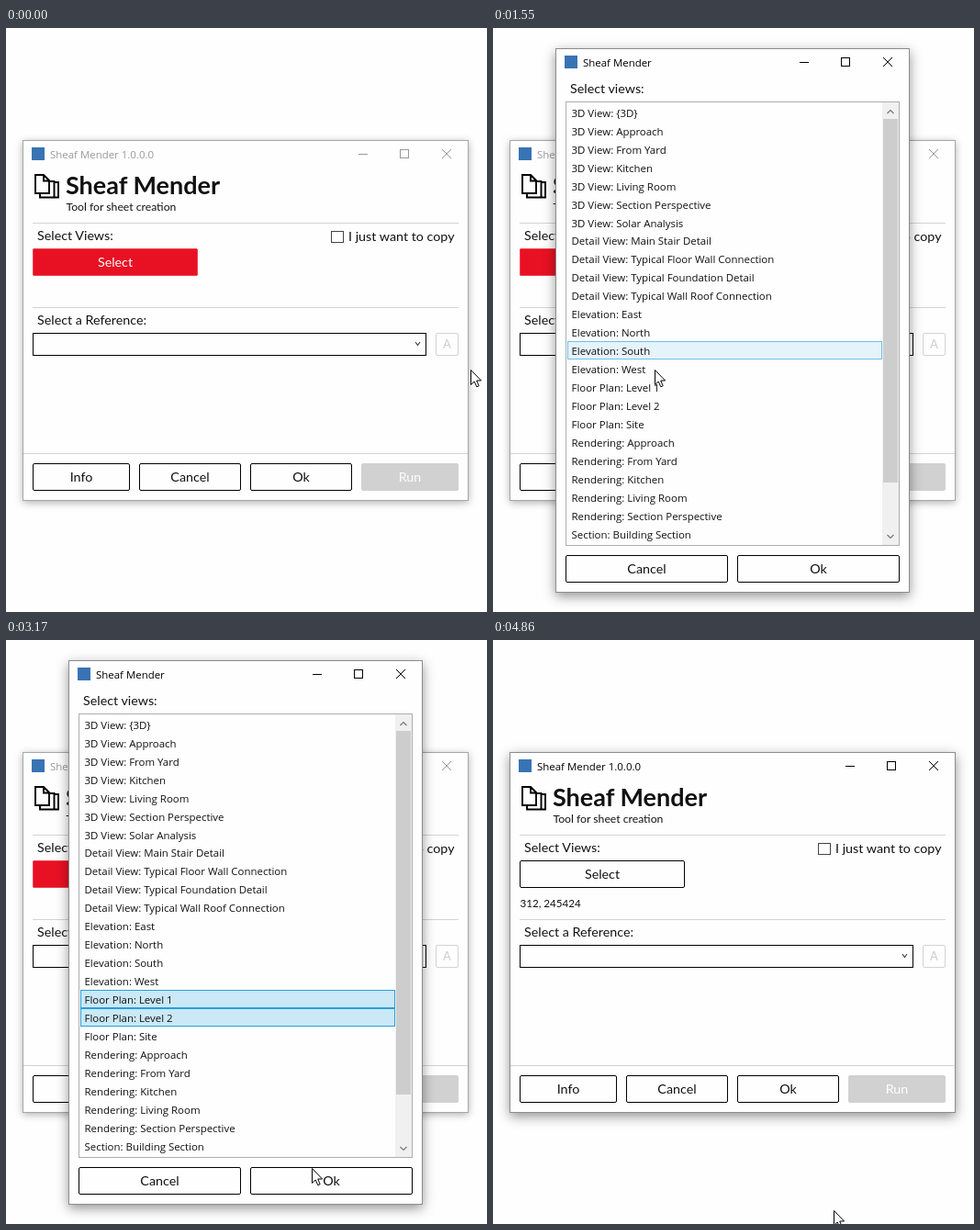
Recreate the animation shown at these times as an HTML page. Size 524 px wide and 636 px high, loop 4890 ms.

```html
<!DOCTYPE html>
<html lang="en">
<head>
<meta charset="utf-8">
<title>Sheaf Mender</title>
<style>
html, body { margin: 0; width: 100%; height: 100%; overflow: hidden; background: #fefefe; }
.layer, .layer svg, #cursor { position: absolute; left: 0; top: 0; }
.layer { width: 524px; height: 636px; }
.frame { position: absolute; box-sizing: border-box; background: #fefefe; border: 1px solid #a6a6a6; box-shadow: 0 2px 8px rgba(0,0,0,.3); }
.active .frame { border-color: #8c8c8c; box-shadow: 0 4px 12px rgba(0,0,0,.42); }
#main .frame { left: 18px; top: 122px; width: 486px; height: 393px; }
#dialog .frame { left: 68px; top: 22px; width: 386px; height: 593px; }
#dialog { transform-origin: 261px 318.5px; }
.bar { color: #999; }
.active .bar { color: #000; }
.bar path { fill: none; stroke: currentColor; }
text { font: 14.3px Lato, sans-serif; fill: #111; }
.mid { text-anchor: middle; }
.ui { font: 11.45px "Open Sans", "Noto Sans", sans-serif; }
.bar text { fill: currentColor; }
.rule { stroke: #d3d3d3; shape-rendering: crispEdges; }
.crisp { shape-rendering: crispEdges; }
.btn rect { fill: #fefefe; stroke: #000; }
.btn .hot { fill: #e81123; stroke: #f0414e; }
.off rect { fill: #d1d1d1; stroke: #d1d1d1; }
.off text, .white { fill: #fefefe; }
.pick { fill: #cbe8f6; stroke: #26a0da; shape-rendering: crispEdges; }
.hover { fill: #e5f3fb; stroke: #70c0e7; shape-rendering: crispEdges; }
</style>
</head>
<body>
<div class="layer" id="main"><div class="frame"></div></div>
<div class="layer" id="dialog"><div class="frame"></div></div>
<svg id="cursor" width="14" height="21"><path d="M.5 .5V16.5L4.2 13L6.8 18.8L9.2 17.7L6.7 12H11.6Z" fill="#fff" stroke="#000"/></svg>
<script>
const LOOP = 4890, ROW = 19.96, TOP = 82;
const $ = id => document.getElementById(id);
const clamp = v => Math.max(0, Math.min(1, v));
const smooth = v => v * v * (3 - 2 * v);

const text = (x, y, s, cls = '', style = '') =>
  `<text x="${x}" y="${y}" class="${cls}" style="${style}">${s}</text>`;
const rect = (x, y, w, h, attr = '') =>
  `<rect x="${x}" y="${y}" width="${w}" height="${h}" ${attr}/>`;
const rule = (x1, x2, y) =>
  `<path class="rule" d="M${x1} ${y + .5}H${x2}"/>`;

// A button with an optional red hover face on top
function button(x, y, w, label, { cls = '', hot = '' } = {}) {
  const face = (r, t) => rect(x + .5, y + .5, w - 1, 29, `rx="1.5" class="${r}"`) +
    text(x + w / 2, y + 20, label, 'mid ' + t);
  return `<g class="btn ${cls}">${face('', '')}${hot && `<g id="${hot}">${face('hot', 'white')}</g>`}</g>`;
}

function titleBar(x, y, right, label) {
  const [min, max, close] = [right - 101, right - 56, right - 10];
  return `<g class="bar">${rect(x, y - 7, 14, 14, 'fill="#3873b3"')}
    ${text(x + 20, y + 5, label, 'ui')}
    <path class="crisp" d="M${min} ${y + .5}h10M${max + .5} ${y - 4.5}h9v9h-9z"/>
    <path d="M${close} ${y - 5}l10 10m0 -10l-10 10"/></g>`;
}

const svg = body => `<svg width="524" height="636">${body}</svg>`;

$('main').innerHTML += svg(
  titleBar(28, 137, 485, 'Sheaf Mender 1.0.0.0') +
  `<path d="M32 160H41L47 166V180H32ZM41 160V166.5H47M48 167H52.5V184.5H37V181M53 168H57V184.5H52"
    fill="none" stroke="#000" stroke-width="1.9"/>` +
  text(65, 181, 'Sheaf Mender', '', 'font-size:27px;font-weight:700') +
  text(65.5, 199, 'Tool for sheet creation', '', 'font-size:12.2px') +
  rule(29, 493, 212) +
  text(34, 231, 'Select Views:') +
  rect(354.5, 221.5, 13, 12, 'class="crisp" fill="#fefefe" stroke="#444"') +
  text(373, 232, 'I just want to copy') +
  button(29, 240, 180, 'Select', { hot: 'selectHot' }) +
  `<g id="result">${text(29.5, 291, '312, 245424', '', 'font-size:11.6px')}</g>` +
  rule(29, 493, 304) +
  text(34, 323, 'Select a Reference:') +
  rect(29.5, 332.5, 428, 24, 'class="crisp" fill="#fefefe" stroke="#000"') +
  '<path d="M446 342l2.5 3.5l2.5 -3.5" fill="none" stroke="#444" stroke-width="1.2"/>' +
  rect(468.5, 332.5, 24, 24, 'rx="1.5" fill="#fefefe" stroke="#d3d3d3"') +
  text(480.5, 349, 'A', 'mid', 'fill:#ccc;font-size:13px') +
  rule(19, 503, 463) +
  button(29, 474, 106, 'Info') +
  button(145, 474, 111, 'Cancel') +
  button(266, 474, 111, 'Ok') +
  button(387, 474, 106, 'Run', { cls: 'off' })
);

const group = (name, items) => items.split(', ').map(s => `${name}: ${s}`);
const views = [
  ...group('3D View', '{3D}, Approach, From Yard, Kitchen, Living Room, Section Perspective, Solar Analysis'),
  ...group('Detail View', 'Main Stair Detail, Typical Floor Wall Connection, Typical Foundation Detail, Typical Wall Roof Connection'),
  ...group('Elevation', 'East, North, South, West'),
  ...group('Floor Plan', 'Level 1, Level 2, Site'),
  ...group('Rendering', 'Approach, From Yard, Kitchen, Living Room, Section Perspective'),
  ...group('Section', 'Building Section')
];
const rowBox = (id, cls) => rect(81.5, 0, 342, 19, `id="${id}" class="${cls}"`);
const placeRow = (id, i, on) => {
  $(id).setAttribute('y', Math.floor(TOP + ROW * i) + .5);
  $(id).style.display = on ? '' : 'none';
};

$('dialog').innerHTML += svg(
  titleBar(78, 37, 435, 'Sheaf Mender') +
  text(84, 71, 'Select views:') +
  rect(79.5, 80.5, 363, 483, 'class="crisp" fill="#fefefe" stroke="#abadb3"') +
  rect(424, 81, 18, 482, 'fill="#f0f0f0"') +
  rect(425, 99, 16, 396, 'fill="#cdcdcd"') +
  '<path d="M429.5 93l3.5 -3.5l3.5 3.5M429.5 552l3.5 3.5l3.5 -3.5" fill="none" stroke="#777" stroke-width="1.2"/>' +
  rowBox('hover', 'hover') + rowBox('pick1', 'pick') + rowBox('pick2', 'pick') +
  views.map((s, i) => text(85.5, Math.round(96.75 + ROW * i), s, 'ui')).join('') +
  button(79, 574, 177, 'Cancel') +
  button(266, 574, 177, 'Ok', { hot: 'okHot' })
);

// Pointer path: time, x, y
const path = [
  [0, 506, 372], [270, 101, 259], [1310, 101, 259], [1550, 176, 372],
  [1680, 180, 386], [1860, 180, 386], [2240, 180, 404], [2590, 180, 404],
  [2850, 245, 480], [3100, 325, 563], [3170, 333, 575], [3410, 349, 597],
  [4755, 349, 597], [4860, 371, 621], [LOOP, 371, 621]
];
function pointer(t) {
  const i = Math.max(1, path.findIndex(p => p[0] > t));
  const [a, b] = [path[i - 1], path[i]];
  const k = (t - a[0]) / (b[0] - a[0]), e = i === 1 ? smooth(k) : k;
  return [a[1] + (b[1] - a[1]) * e, a[2] + (b[2] - a[2]) * e];
}

function draw(t) {
  const [x, y] = pointer(t).map(Math.round);
  $('cursor').style.transform = `translate(${x}px,${y}px)`;

  const opening = clamp((t - 800) / 300), closing = clamp((t - 3720) / 280);
  const closed = t >= 3750, shown = t >= 820 && closing < 1;
  const dialog = $('dialog');
  dialog.style.display = shown ? '' : 'none';
  dialog.className = 'layer active';
  const scale = closed ? 1 - .1 * closing : 1 - .1 * (1 - opening) ** 3;
  dialog.style.transform = scale < 1 ? `scale(${scale})` : 'none';
  dialog.style.opacity = closed ? 1 - closing : clamp(opening * 1.25);

  $('main').className = 'layer' + (closed || t >= 650 && t < 820 ? ' active' : '');
  $('selectHot').style.display = closed ? 'none' : '';
  $('result').style.display = closed ? '' : 'none';

  // Row hover trails the pointer slightly
  const row = Math.floor((pointer(Math.max(0, t - 35))[1] - TOP) / ROW);
  placeRow('hover', row, row >= 0 && row < views.length);
  placeRow('pick1', 15, t >= 1820);
  placeRow('pick2', 16, t >= 2580);
  $('okHot').style.opacity = clamp((t - 3180) / 180);
}

const start = performance.now();
function tick() {
  draw((performance.now() - start) % LOOP);
  requestAnimationFrame(tick);
}
tick();
</script>
</body>
</html>
```
